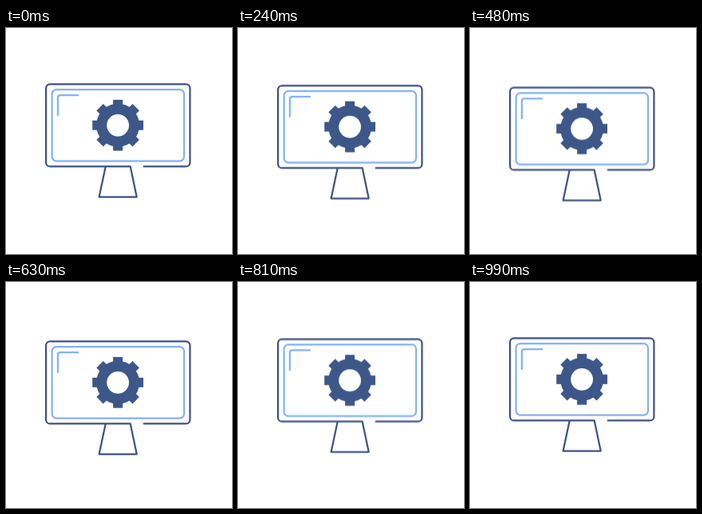
Write an HTML page that moves like this. It is 283x283 px and loops after 1.02 s.

```html
<!DOCTYPE html>
<html lang="en">
<head>
<meta charset="utf-8">
<title>Monitor settings</title>
<style>
  html, body {
    margin: 0;
    width: 100%;
    height: 100%;
    overflow: hidden;
    background: #fff;
  }
  svg {
    display: block;
    width: 100%;
    height: 100%;
  }
  .line {
    fill: none;
    stroke-width: 2.2;
    stroke-linecap: round;
    stroke-linejoin: round;
  }
  .dark { stroke: #3c5186; }
  .light { stroke: #82b1fb; }
  .gear { fill: #3d5789; }
  .hole { fill: #fff; }
  .bob {
    animation: bob 510ms cubic-bezier(.6, 0, .4, 1) infinite alternate;
  }
  @keyframes bob {
    from { transform: translateY(0); }
    to { transform: translateY(4.3px); }
  }
</style>
</head>
<body>
<svg viewBox="0 0 283 283">
  <defs>
    <rect id="bar" x="-6" y="-31.9" width="12" height="63.8"/>
  </defs>
  <g class="bob">
    <path class="line dark" d="M172.7 173.4H225.4a5 5 0 0 0 5-5V75.3a5 5 0 0 0-5-5H55.1a5 5 0 0 0-5 5V168.4a5 5 0 0 0 5 5H155.7L163.7 211.6H116.6L124.6 174"/>
    <rect class="line light" x="57.6" y="77.1" width="165.4" height="89.5" rx="5.5"/>
    <path class="line light" d="M64.9 109V87.1a3 3 0 0 1 3-3H90.2"/>
    <g class="gear" transform="translate(140.1 121.8)">
      <circle r="27"/>
      <use href="#bar"/>
      <use href="#bar" transform="rotate(45)"/>
      <use href="#bar" transform="rotate(90)"/>
      <use href="#bar" transform="rotate(135)"/>
      <circle class="hole" r="13.9"/>
    </g>
  </g>
</svg>
</body>
</html>
```
